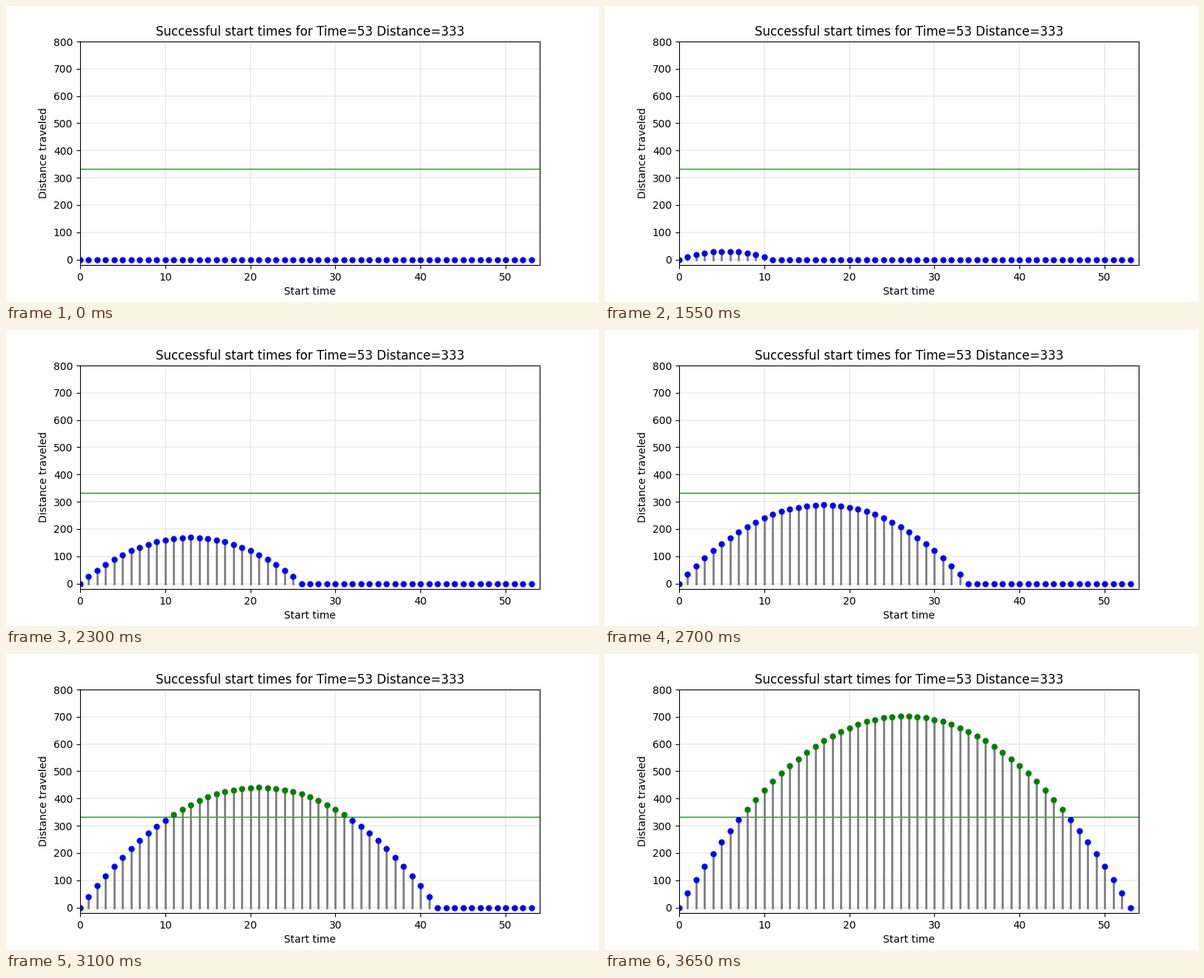
Write a matplotlib script that moves like this. It is 800 by 400 pixels and loops after 5650 ms.

```python
import numpy as np
import matplotlib.pyplot as plt
from matplotlib.animation import FuncAnimation

TIME, RECORD = 53, 333
HOLD_START, HOLD_END = 20, 39
FRAME_MS = 50

starts = np.arange(TIME + 1)

fig, ax = plt.subplots(figsize=(8, 4), dpi=100)
fig.subplots_adjust(left=0.125, right=0.9, bottom=0.125, top=0.88)
ax.set_title(f"Successful start times for Time={TIME} Distance={RECORD}")
ax.set_xlabel("Start time")
ax.set_ylabel("Distance traveled")
ax.grid(linewidth=0.3)

ax.axhline(RECORD, color="green", linewidth=0.8)
stems = ax.vlines(starts, 0, 0, color="gray", linewidth=2, capstyle="projecting")
losing, = ax.plot([], [], "o", color="blue", markersize=5)
winning, = ax.plot([], [], "o", color="green", markersize=5)
ax.set_xlim(0, TIME + 1)
ax.set_ylim(-20, 800)


def update(frame):
    elapsed = min(max(frame - HOLD_START, 0), TIME)
    # Speed equals the start time; travel lasts for the time left.
    distance = starts * np.maximum(elapsed - starts, 0)
    wins = distance > RECORD
    stems.set_segments([[(x, 0), (x, d)] for x, d in zip(starts, distance)])
    losing.set_data(starts[~wins], distance[~wins])
    winning.set_data(starts[wins], distance[wins])
    return stems, losing, winning


anim = FuncAnimation(fig, update, frames=HOLD_START + TIME + 1 + HOLD_END,
                     interval=FRAME_MS, repeat=True, repeat_delay=0)
plt.show()
```
